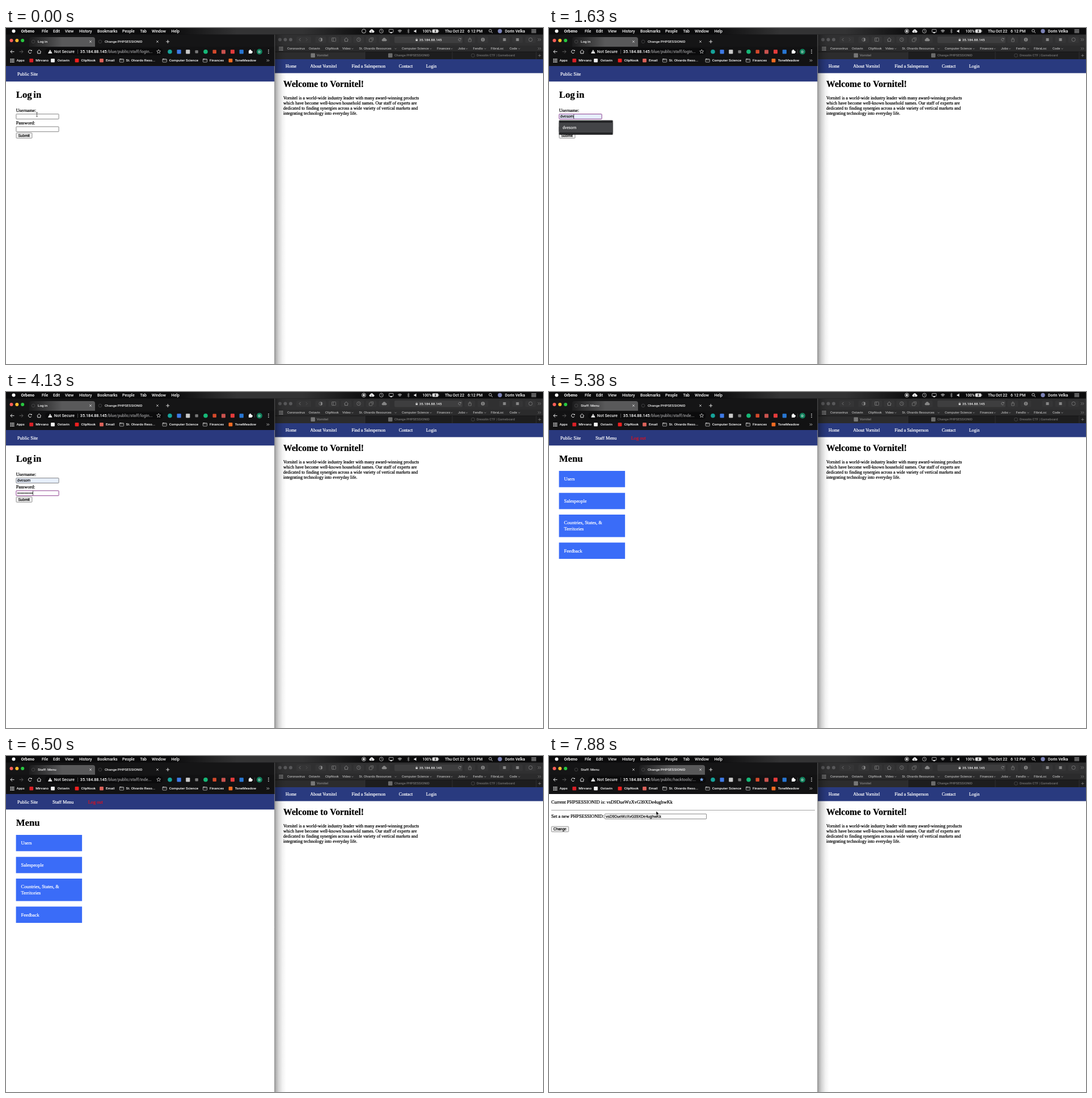
Recreate the animation shown at these times as an HTML page with a canvas. Size 947 px wide and 592 px high, loop 8 s.

```html
<!DOCTYPE html>
<html lang="en">
<head>
<meta charset="utf-8">
<title>Login session</title>
<style>
html, body { margin: 0; width: 100%; height: 100%; overflow: hidden; background: #fff; }
canvas { display: block; width: 947px; height: 592px; }
</style>
</head>
<body>
<canvas id="stage"></canvas>
<script>
const W = 947, H = 592, LOOP = 8000;
const canvas = document.getElementById('stage');
const g = canvas.getContext('2d');
const dpr = window.devicePixelRatio || 1;
canvas.width = W * dpr;
canvas.height = H * dpr;

const UI = 'Roboto, Inter, sans-serif';
const SERIF = '"Liberation Serif", "Times New Roman", serif';
const SANS = '"Liberation Sans", Arial, sans-serif';
const USER = 'dvesorn', TOKEN = 'vsD9DueWzXvG39XDe4ughwKk';
const HOST = '35.184.88.145';

// ---- helpers ----
function rect(x, y, w, h, fill) {
  g.fillStyle = fill;
  g.fillRect(x, y, w, h);
}
function round(x, y, w, h, r, fill, stroke, lw = 0.7) {
  g.beginPath();
  g.roundRect(x, y, w, h, r);
  if (fill) { g.fillStyle = fill; g.fill(); }
  if (stroke) { g.strokeStyle = stroke; g.lineWidth = lw; g.stroke(); }
}
function disc(x, y, r, fill) {
  g.beginPath();
  g.arc(x, y, r, 0, 7);
  g.fillStyle = fill;
  g.fill();
}
function ring(x, y, r, color, lw = 0.7) {
  g.beginPath();
  g.arc(x, y, r, 0, 7);
  g.strokeStyle = color;
  g.lineWidth = lw;
  g.stroke();
}
function line(color, lw, ...p) {
  g.beginPath();
  g.moveTo(p[0], p[1]);
  for (let i = 2; i < p.length; i += 2) g.lineTo(p[i], p[i + 1]);
  g.strokeStyle = color;
  g.lineWidth = lw;
  g.stroke();
}
// y is the middle of the capitals; page text gets a hairline of extra weight
function text(s, x, y, size, color = '#fff', font = UI, weight = font === UI ? 500 : 400) {
  g.font = `${weight} ${size}px ${font}`;
  g.fillStyle = g.strokeStyle = color;
  g.lineWidth = 0.22;
  g.fillText(s, x, y + size * 0.34);
  if (font !== UI) g.strokeText(s, x, y + size * 0.34);
}
function shade(x0, y0, x1, y1, ...stops) {
  const s = g.createLinearGradient(x0, y0, x1, y1);
  stops.forEach((c, i) => s.addColorStop(i / (stops.length - 1), c));
  return s;
}
function chevron(x, y, w, h, color, lw = 0.8) {
  line(color, lw, x - w, y - h, x, y, x - w, y + h);
}
function down(x, y, color) {
  line(color, 0.7, x - 1.5, y - 0.8, x, y + 0.8, x + 1.5, y - 0.8);
}
function cross(x, y, r, color) {
  line(color, 0.8, x - r, y - r, x + r, y + r);
  line(color, 0.8, x + r, y - r, x - r, y + r);
}
function grid(x, y, step, size, color) {
  for (let i = 0; i < 9; i++)
    rect(x + (i % 3) * step, y + Math.floor(i / 3) * step, size, size, color);
}
function folder(x, y) {
  round(x - 3.6, y - 2.5, 7.2, 5.4, 0.7, null, '#ddd');
  line('#ddd', 0.9, x - 3.6, y - 2.7, x - 0.6, y - 2.7);
  line('#ddd', 0.6, x - 3.6, y - 1.1, x + 3.6, y - 1.1);
}
function reload(x, y, r, color) {
  g.beginPath();
  g.arc(x, y, r, 0.5, 5.6);
  g.strokeStyle = color;
  g.lineWidth = 0.9;
  g.stroke();
  rect(x + r - 1.2, y - r, 1.8, 1.6, color);
}
function house(x, y, color) {
  line(color, 0.9, x - 3.6, y + 0.2, x, y - 3.2, x + 3.6, y + 0.2);
  line(color, 0.9, x - 2.5, y, x - 2.5, y + 3.1, x + 2.5, y + 3.1, x + 2.5, y);
}
function clockIcon(x, y, r, color) {
  ring(x, y, r, color);
  line(color, 0.6, x, y - r * 0.6, x, y, x + r * 0.5, y + 0.6);
}
function cloud(x, y, color) {
  disc(x - 2.3, y + 0.7, 2, color);
  disc(x, y - 0.6, 2.6, color);
  disc(x + 2.5, y + 0.7, 2, color);
  rect(x - 2.3, y, 4.8, 2.7, color);
}
function star(x, y, r, color, filled) {
  g.beginPath();
  for (let i = 0; i < 10; i++) {
    const a = i * Math.PI / 5 - Math.PI / 2, q = i % 2 ? r * 0.45 : r;
    g.lineTo(x + q * Math.cos(a), y + q * Math.sin(a));
  }
  g.closePath();
  g.fillStyle = g.strokeStyle = color;
  g.lineWidth = 0.7;
  if (filled) g.fill(); else g.stroke();
}

// ---- system menu bar ----
function menuBar(t) {
  rect(0, 0, W, 11.5, '#0b0b0c');
  rect(290, 0, 350, 11.5, shade(290, 0, 640, 0, '#0b0b0c', '#333334', '#333334', '#0b0b0c'));
  disc(13.5, 5.5, 3, '#fff');
  text('Orbeno', 26.5, 5.5, 7.2, '#fff', UI, 700);
  [['File', 63], ['Edit', 83], ['View', 104], ['History', 129], ['Bookmarks', 161],
   ['People', 205], ['Tab', 236.5], ['Window', 257], ['Help', 291.5]]
    .forEach(([s, x]) => text(s, x, 5.5, 7));

  const c = '#e8e8e8';
  ring(631, 5.5, 3.5, c, 0.8);
  if (t >= 1130) disc(631, 5.5, 1.9, c);
  cloud(645, 5.5, '#fff');
  line('#111', 0.8, 645, 8, 645, 4.5);
  clockIcon(662, 5.5, 3.4, c);
  round(675.5, 2.5, 7.5, 5, 0.6, null, c);
  line(c, 1.6, 677.5, 8.3, 681, 8.3);
  for (const r of [1.5, 3.2, 4.9]) {
    g.beginPath();
    g.arc(694.5, 8.5, r, -2.35, -0.8);
    g.strokeStyle = c;
    g.lineWidth = 1;
    g.stroke();
  }
  line('#aaa', 0.7, 707.5, 3.5, 711.5, 7.2, 709.5, 9, 709.5, 2, 711.5, 3.8, 707.5, 7.5);
  g.beginPath();
  g.moveTo(719.5, 4.5); g.lineTo(721, 4.5); g.lineTo(723.5, 2.5);
  g.lineTo(723.5, 8.5); g.lineTo(721, 6.7); g.lineTo(719.5, 6.7);
  g.fillStyle = c;
  g.fill();
  text('100%', 734.5, 5.5, 6.6);
  round(752, 2.8, 10, 5.4, 1, '#ddd', c, 0.6);
  rect(762.6, 4.5, 0.9, 2, c);
  line('#111', 1, 757.8, 3.2, 756.4, 5.6, 758, 5.6, 756.7, 7.9);
  text('Thu Oct 22', 774, 5.5, 7);
  text('6', 814, 5.5, 7);
  // the clock's colon toggles once a second
  if (Math.floor((t + 870) / 1000) % 2) text(':', 818.1, 5.2, 7);
  text('12 PM', 820, 5.5, 7);
  ring(854, 4.8, 2.3, c, 0.8);
  line(c, 0.9, 855.7, 6.5, 858, 8.8);
  disc(871, 5.5, 3.7, '#7d84b8');
  text('Dorin Velka', 880, 5.5, 6.9);
  for (const y of [3, 5.5, 8]) line(c, 0.9, 926.5, y, 935, y);
}

// ---- right window ----
function rightWindow() {
  rect(474, 11, 473, 581, '#fff');
  rect(474, 11, 473, 20, '#303031');
  rect(474, 31, 473, 11, '#2b2b2c');
  const c = '#858585';
  for (const x of [483, 492.5, 502]) disc(x, 20.5, 3, '#58585a');
  round(512, 15, 26, 11.5, 2, '#353536');
  line('#777', 0.9, 519.5, 18, 517, 20.5, 519.5, 23);
  chevron(531.5, 20.5, 2.5, 2.5, '#555');
  for (const x of [555, 578, 600, 622, 644, 667, 818, 841, 879, 902, 925])
    round(x - 9.5, 15, 19, 11.5, 2, '#353536');
  ring(555, 20.5, 3, c);
  rect(555, 18, 2.5, 5, c);
  round(574.5, 17.5, 7, 6, 0.7, null, c);
  line(c, 0.7, 577, 17.5, 577, 23.5);
  house(600, 20.5, c);
  clockIcon(622, 20.5, 3.3, c);
  round(640.5, 19, 5.3, 5, 0.6, null, c);
  line(c, 0.7, 642.5, 17.3, 647.6, 17.3, 647.6, 22);
  cloud(667, 20.5, c);
  round(685, 15, 120, 11.5, 2, '#3e3e3f');
  rect(722.5, 20, 3.4, 3, '#ccc');
  ring(724.2, 19.7, 1.2, '#ccc', 0.6);
  text(HOST, 728.8, 20.6, 6.1, '#ececec');
  reload(800, 20.5, 2.2, '#888');
  round(815.5, 19, 5, 5, 0.5, null, c);
  line(c, 0.8, 818, 21.5, 818, 16.5);
  disc(841, 20.5, 3.3, c);
  line('#333', 0.9, 841, 18.5, 841, 22.5);
  rect(876.5, 18, 5, 5, c);
  rect(899.5, 18, 5, 5, c);
  ring(925, 20.5, 3.2, c);
  for (const x of [940, 943]) chevron(x, 20.5, 2, 2.3, c);

  grid(481.5, 33, 2.6, 1.7, '#999');
  [['Coronavirus', 496], ['Ostavin', 534], ['ClipNook', 563], ['Video', 593, 611],
   ['St. Olvardo Resources', 622.5, 687], ['Computer Science', 698, 749],
   ['Finances', 760, 786], ['Jobs', 797, 812.5], ['Fendlo', 823.5, 845],
   ['FibraLoc', 855], ['Code', 888, 905]].forEach(([s, x, arrow]) => {
    text(s, x, 36.2, 5.8, '#b3b3b3');
    if (arrow) down(arrow, 36.5, '#999');
  });
  for (const x of [940, 943]) chevron(x, 36.3, 1.8, 2, c);

  rect(474, 42, 159, 13, '#2c2c2d');
  rect(633, 42, 314, 13, '#1d1d1e');
  line('#0c0c0c', 0.7, 474, 42, 947, 42);
  for (const x of [633, 787, 935]) line('#3c3c3d', 0.7, x, 42, x, 55);
  round(537.5, 44.5, 7.5, 7.5, 1, '#777');
  text('Vornitel', 548, 48.5, 5.8, '#858585');
  round(674, 44.5, 7.5, 7.5, 1, '#6b6b6b');
  text('Change PHPSESSIONID', 685, 48.5, 5.8, '#777');
  ring(823.5, 48.3, 3, '#555');
  text('Drexolin CTF | Gameboard', 830, 48.5, 5.8, '#707070');
  line('#888', 0.7, 938.5, 48.5, 943.5, 48.5);
  line('#888', 0.7, 941, 46, 941, 51);

  rect(474, 55, 473, 24.5, '#293a7f');
  [['Home', 493], ['About Vornitel', 536.5], ['Find a Salesperson', 609.5],
   ['Contact', 692.7], ['Login', 740.7]]
    .forEach(([s, x]) => text(s, x, 67.5, 7.9, '#fff', SERIF));
  text('Welcome to Vornitel!', 489, 99, 15.75, '#000', SERIF, 700);
  ['Vornitel is a world-wide industry leader with many award-winning products',
   'which have become well-known household names. Our staff of experts are',
   'dedicated to finding synergies across a wide variety of vertical markets and',
   'integrating technology into everyday life.']
    .forEach((s, i) => text(s, 489, 123.4 + i * 8.88, 7.89, '#000', SERIF));
  rect(474, 11, 20, 581, shade(474, 0, 494, 0,
    'rgba(0,0,0,.36)', 'rgba(0,0,0,.17)', 'rgba(0,0,0,.05)', 'rgba(0,0,0,0)'));
}

// ---- left window ----
function tab(x, w, title, active, hover) {
  if (active || hover) {
    const light = active ? '#59595a' : '#333334';
    round(x, 16, w, 17, [4, 4, 0, 0], shade(x, 0, x + w, 0, '#1c1c1d', light, light));
  }
  ring(x + 7, 24, 2.8, '#505051');
  text(title, x + 15, 24, 6.25, '#f0f0f0');
  cross(x + w - 8, 24, 1.8, '#ddd');
}

function leftChrome(page, hover) {
  rect(0, 11, 474, 22, '#151516');
  rect(0, 33, 474, 34, '#121213');
  disc(9.5, 22, 3, '#ff5f57');
  disc(19.3, 22, 3, '#febc2e');
  disc(29.2, 22, 3, '#28c840');
  const tools = page === 'tools';
  tab(41, 116, page === 'login' ? 'Log in' : 'Staff: Menu', !tools);
  tab(159, 116, 'Change PHPSESSIONID', tools, hover);
  line('#eee', 0.9, 282.3, 24, 288.3, 24);
  line('#eee', 0.9, 285.3, 21, 285.3, 27);

  line('#fff', 0.9, 14.5, 41.7, 8, 41.7);
  line('#fff', 0.9, 10.8, 38.8, 8, 41.7, 10.8, 44.6);
  line('#666', 0.9, 23.5, 41.7, 30, 41.7);
  line('#666', 0.9, 27.2, 38.8, 30, 41.7, 27.2, 44.6);
  reload(42.3, 41.7, 2.8, '#fff');
  house(58.3, 41.7, '#fff');
  round(69, 35.5, 208, 12.4, 6.2, '#0b0b0c');
  g.beginPath();
  g.moveTo(77.8, 38.3); g.lineTo(81.6, 44.8); g.lineTo(74, 44.8);
  g.fillStyle = '#fff';
  g.fill();
  line('#111', 0.8, 77.8, 40.5, 77.8, 42.7);
  text('Not Secure', 84.8, 41.8, 7.3, '#eee');
  line('#666', 0.7, 126.5, 38, 126.5, 45.5);
  text(HOST, 130.8, 41.8, 7.2);
  const path = { login: 'staff/login...', menu: 'staff/inde...', tools: 'hacktools/...' }[page];
  text('/blue/public/' + path, 178, 41.8, 7.1, '#9a9a9c');
  star(269.2, 41.6, 3.7, tools ? '#7aaaf5' : '#ddd', tools);
  disc(289, 41.7, 3.8, '#16a39a');
  round(301.5, 38.2, 7.2, 7.2, 1, '#3e7ae6');
  round(317.2, 38.2, 7.2, 7.2, 1, '#c9c9c9');
  round(333.5, 39.2, 5.4, 5.4, 1, '#777');
  disc(352, 41.7, 3.8, '#16b877');
  round(364.5, 38.5, 6.5, 6.5, 1, '#d2492b');
  round(380, 38.5, 7, 7, 1, '#c8524e');
  round(396, 38.2, 7, 7, 1, '#e33b3b');
  round(411.7, 38.2, 7.2, 7.2, 1, '#2876d2');
  rect(428, 39.7, 5.5, 5.3, '#fff');
  disc(430.7, 39.4, 1.3, '#fff');
  disc(433.7, 42.3, 1.3, '#fff');
  line('#555', 0.6, 438.5, 38, 438.5, 45);
  disc(447, 41.7, 5, '#12805c');
  text('D', 445.1, 41.8, 5.8);
  for (const y of [38.9, 41.7, 44.5]) disc(463, y, 0.8, '#fff');

  grid(7.5, 54, 2.6, 1.7, '#e4e4e4');
  const marks = [[44.7, '#d81f26'], [82.5, '#f2f2f2'], [125, '#f01f1f'],
    [168.5, '#dc625a'], [396, '#f26b22']];
  marks.forEach(([x, c]) => round(x - 3.4, 54, 6.8, 6.6, 1, c));
  for (const x of [204, 279.7, 351]) folder(x, 57.2);
  [['Apps', 18.5], ['Mirvano', 52.3], ['Ostavin', 90.8], ['ClipNook', 132.5], ['Email', 176],
   ['St. Olvardo Reso...', 211.5], ['Computer Science', 287.7], ['Finances', 359],
   ['ToneMeadow', 403.7]].forEach(([s, x]) => text(s, x, 57.3, 6.25));
  for (const x of [461.5, 464]) chevron(x, 57.3, 1.7, 1.8, '#ddd');
}

function field(x, y, w, fill = '#fff', focus = false) {
  round(x + 0.4, y + 0.4, w - 0.8, 8.8, 0.8, fill, focus ? '#8d3f8f' : '#666', focus ? 1 : 0.8);
}
function button(s, x, y, w) {
  round(x + 0.3, y, w - 0.6, 9.4, 1.2, '#efefef', '#6c6c6c');
  text(s, x + 3.8, y + 4.8, 6.55, '#000', SANS);
}
function caret(x, y) {
  rect(x, y, 0.7, 7.6, '#000');
}
function navBar(items) {
  rect(0, 67, 473.5, 27.3, '#2a397e');
  items.forEach(([s, x, c]) => text(s, x, 81.6, 8.3, c, SERIF));
}
function heading(s) {
  g.wordSpacing = '-1.6px';
  text(s, 17.7, 116.8, 16.8, '#000', SERIF, 700);
  g.wordSpacing = '0px';
}

function loginPage(t) {
  navBar([['Public Site', 20, '#fff']]);
  heading('Log in');
  text('Username:', 17.7, 144.8, 8.2, '#000', SERIF);
  text('Password:', 17.7, 167, 8.2, '#000', SERIF);

  const inUser = t >= 130 && t < 2880, inPass = t >= 2880;
  const name = t < 630 ? '' : t < 1630 ? USER[0] : USER;
  field(17.5, 151.2, 76, t >= 1630 ? '#e7effd' : '#fff', inUser);
  text(name, 19.8, 156.2, 6.6, '#000', SANS);
  const userBlink = (t >= 1250 && t < 1630) || (t >= 2130 && t < 2380);
  if (inUser && !userBlink) caret(20 + g.measureText(name).width, 152.2);

  field(17.5, 173.5, 76, '#fff', inPass);
  const dots = t < 3880 ? 0 : Math.min(12, 4 * (1 + Math.floor((t - 3880) / 124)));
  for (let i = 0; i < dots; i++) disc(21 + i * 2.3, 178.2, 0.9, '#000');
  const passBlink = (t >= 3380 && t < 3880) || t >= 4500;
  if (inPass && !passBlink) caret(19.5 + dots * 2.3, 174.4);
  button('Submit', 17.7, 184.8, 28.6);

  if (t >= 750 && t < 2380) {
    g.save();
    g.shadowColor = 'rgba(0,0,0,.4)';
    g.shadowBlur = 2 * dpr;
    round(17.7, 162.7, 94.8, 25.3, 1, '#252628');
    g.restore();
    if (t >= 1630) rect(17.7, 167, 94.8, 17, '#434447');
    text(USER, 24, 175.4, 6.8, '#f0f0f0');
  }
  if (t < 630) {
    line('#222', 0.7, 54.5, 149, 54.5, 156);
    line('#222', 0.7, 53, 148.5, 54.5, 149.2, 56, 148.5);
    line('#222', 0.7, 53, 156.5, 54.5, 155.8, 56, 156.5);
  }
}

function menuPage() {
  navBar([['Public Site', 20, '#fff'], ['Staff Menu', 82, '#fff'], ['Log out', 144.7, '#e3101c']]);
  heading('Menu');
  [[139, 28.7, 'Users'], [177.7, 28.7, 'Salespeople'],
   [216, 39.6, 'Countries, States, &', 'Territories'], [265.3, 28.7, 'Feedback']]
    .forEach(([y, h, ...rows]) => {
      rect(17.6, y, 116.5, h, '#3a6cf8');
      rows.forEach((s, i) => text(s, 26.6, y + 14.6 + i * 10.8, 8.35, '#fff', SERIF));
    });
}

function toolsPage() {
  text('Current PHPSESSIONID is: ' + TOKEN, 4, 81.1, 8.35, '#000', SERIF);
  line('#8c8c8c', 0.8, 4, 95.5, 469, 95.5);
  text('Set a new PHPSESSIONID:', 4, 106.1, 8.2, '#000', SERIF);
  field(98, 101.7, 180);
  text(TOKEN, 100.3, 106.7, 6.65, '#000', SANS);
  button('Change', 4, 124.2, 31);
}

// ---- pointer ----
function arrow(x, y) {
  g.beginPath();
  [[0, 0], [0, 7.4], [1.7, 5.9], [2.9, 8.5], [4, 8], [2.9, 5.5], [5.2, 5.3]]
    .forEach(([dx, dy]) => g.lineTo(x + dx, y + dy));
  g.closePath();
  g.fillStyle = '#000';
  g.fill();
  g.strokeStyle = '#fff';
  g.lineWidth = 0.6;
  g.stroke();
}
function glide(t, t0, t1, a, b) {
  const u = Math.max(0, Math.min(1, (t - t0) / (t1 - t0)));
  const e = u * u * (3 - 2 * u);
  return [a[0] + (b[0] - a[0]) * e, a[1] + (b[1] - a[1]) * e];
}
function pointer(t) {
  if (t < 6630) return;
  const tabSpot = [208.5, 19.5];
  const p = t < 7380 ? glide(t, 6580, 7130, [54, 152], tabSpot)
                     : glide(t, 7540, 7880, tabSpot, [189, 97]);
  if (t >= 7250 && t < 7380) {
    ring(209.5, 22, 10.3, '#e4e4e4', 0.9);
    ring(209.5, 22, 8, '#bdbdbd', 0.9);
  }
  arrow(...p);
}

function draw(t) {
  g.setTransform(dpr, 0, 0, dpr, 0, 0);
  rect(0, 0, W, H, '#fff');
  rightWindow();
  const page = t < 4750 ? 'login' : t < 7380 ? 'menu' : 'tools';
  rect(0, 67, 473.5, 525, '#fff');
  leftChrome(page, t >= 7130 && t < 7380);
  if (page === 'login') loginPage(t);
  else if (page === 'menu') menuPage();
  else toolsPage();
  line('#6a6a6a', 0.8, 473.8, 11, 473.8, H);
  menuBar(t);
  pointer(t);
}

const start = performance.now();
function frame() {
  draw((performance.now() - start) % LOOP);
  requestAnimationFrame(frame);
}
frame();
</script>
</body>
</html>
```
